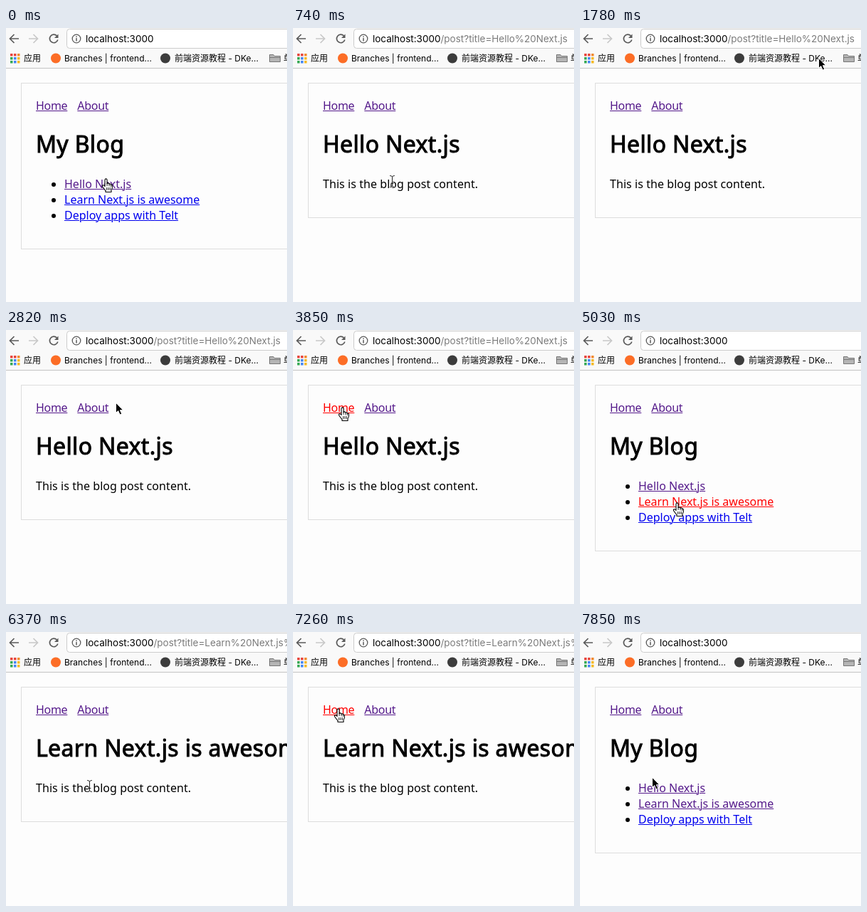
Write an HTML page that moves like this. It is 395 px wide and 385 px high and loops after 8 s.

```html
<!DOCTYPE html>
<html lang="en">
<head>
<meta charset="utf-8">
<title>My Blog</title>
<style>
html, body { margin: 0; width: 100%; height: 100%; overflow: hidden; background: #fdfdfd; }
body { position: relative; font: 16px/22px "Noto Sans", sans-serif; color: #000; }
svg { position: absolute; left: 0; top: 0; width: 395px; height: 385px; overflow: hidden; }
svg text { font: 12px Inter, "Noto Sans CJK SC", sans-serif; }
svg .url { font-size: 13.5px; }
#page { position: absolute; left: 21px; top: 77px; width: 500px; padding: 20px; border: 1px solid #ddd; }
nav { height: 22px; letter-spacing: -.3px; }
nav a { margin-right: 14px; float: left; }
a { color: #551a8b; text-decoration: underline; text-decoration-thickness: 1px; }
a.new { color: #00e; }
a.active { color: #f00; }
h1 {
  position: relative; top: -1px; margin: 21.44px 0; white-space: nowrap;
  font: 400 32px/45px "Noto Sans", sans-serif; letter-spacing: .35px; -webkit-text-stroke: 1px #000;
}
ul { margin: 16px 0; padding-left: 40px; }
p { margin: 16px 0; letter-spacing: .06px; }
[hidden] { display: none; }
</style>
</head>
<body>
<div id="page">
  <nav><a id="home">Home</a><a>About</a></nav>
  <h1 id="title"></h1>
  <ul id="list">
    <li><a id="hello">Hello Next.js</a></li>
    <li><a id="learn">Learn Next.js is awesome</a></li>
    <li><a class="new">Deploy apps with Telt</a></li>
  </ul>
  <p id="post">This is the blog post content.</p>
</div>

<svg viewBox="0 0 395 385">
  <path d="M0 0H395V56H0Z" fill="#f9f9f9"/>
  <path d="M0 56.5H395" stroke="#c4c4c4"/>
  <rect x="85.5" y="1.5" width="330" height="27" rx="4" fill="#fff" stroke="#ccc"/>

  <g fill="none" stroke="#5a5a5a" stroke-width="1.7">
    <path d="M18 15H6M11.500 9L5.500 15L11.500 21"/>
    <path d="M32 15H44M38.500 9L44.500 15L38.500 21" stroke="#c8c8c8"/>
    <path d="M71.500 11A5.800 5.800 0 1 0 72.800 16.500"/>
    <circle cx="99" cy="15" r="5.800" stroke-width="1.300"/>
    <path d="M99 14V18.500M99 11.500V13" stroke-width="1.500"/>
  </g>
  <path d="M73.500 8.500V14H68Z" fill="#5a5a5a"/>
  <text class="url" x="112" y="20">localhost:3000<tspan id="path" fill="#7b7b7b"></tspan></text>

  <g id="apps"></g>
  <text x="25" y="47">应用</text>
  <circle cx="70" cy="42.500" r="7" fill="#fc6d26"/>
  <text x="82" y="47">Branches | frontend...</text>
  <circle cx="224" cy="42.500" r="7" fill="#3c3c3c"/>
  <text x="237" y="47">前端资源教程 - DKe...</text>
  <path d="M370.500 47.500V37.500H376L377.500 39.500H385.500V47.500ZM370.500 41.500H385.500" fill="#b5b5b5" stroke="#777"/>
  <text x="390" y="47">单</text>

  <g id="cursor" stroke-linejoin="round" stroke-linecap="round">
    <path id="arrow" d="M0 0V14L3.200 11L5.600 16.500L8.200 15.300L5.900 10.200H10Z" fill="#000" stroke="#fff"/>
    <g id="beam" fill="none">
      <path d="M-3 -8Q0 -8 0 -6Q0 -8 3 -8M0 -6V6M-3 8Q0 8 0 6Q0 8 3 8M-1.500 3H1.500" stroke="#fff" stroke-width="2.500" opacity=".6"/>
      <path d="M-3 -8Q0 -8 0 -6Q0 -8 3 -8M0 -6V6M-3 8Q0 8 0 6Q0 8 3 8M-1.500 3H1.500" stroke="#222"/>
    </g>
    <g id="hand" stroke="#000" stroke-width="1.100">
      <path d="M-1.500 9V0Q-1.300 -1.600 0 -1.600Q1.400 -1.600 1.600 0V5Q3.800 3.500 4.600 5.700Q6.600 4.700 7.100 6.700Q9 6 9 8.500Q9.200 12 7.500 14V17H-.5V15Q-2.500 13 -4.800 9.500Q-5.600 7.500 -4 7.300Q-2.800 7.300 -1.500 9Z" fill="#fff"/>
      <path d="M1.600 5V8M4.600 6V8.500M7.100 7V9M1.200 11V14M3.500 11V14M5.800 11V14" fill="none" stroke-width=".9"/>
    </g>
  </g>
</svg>

<script>
const $ = id => document.getElementById(id);
const LOOP = 8000;
const shapes = ["arrow", "beam", "hand"];
const titles = { hello: "Hello Next.js", learn: "Learn Next.js is awesome" };

// time, open post ("" is the index), pressed link
const views = [
  [0, "", ""], [450, "", "hello"], [590, "hello", ""],
  [3850, "hello", "home"], [4150, "", ""],
  [5030, "", "learn"], [5180, "learn", ""],
  [7260, "learn", "home"], [7410, "", ""]
];

// time, cursor shape, hotspot
const moves = [
  [0, "hand", 140, 213], [740, "beam", 139, 215],
  [1190, "arrow", 150, 196], [1340, "arrow", 185, 150], [1490, "arrow", 235, 110],
  [1630, "arrow", 290, 75], [1780, "arrow", 335, 42], [1930, "beam", 355, 25],
  [2080, "beam", 362, 18], [2230, "beam", 363, 15],
  [2530, "arrow", 360, 40], [2680, "arrow", 250, 85], [2820, "arrow", 154, 102],
  [2970, "hand", 115, 110], [3120, "hand", 110, 109],
  [3410, "hand", 108, 109], [3560, "arrow", 92, 108], [3700, "hand", 75, 110], [3850, "hand", 69, 110],
  [4440, "arrow", 85, 150], [4590, "arrow", 120, 202], [4730, "hand", 136, 244],
  [5180, "arrow", 136, 244], [6370, "beam", 117, 216], [6520, "beam", 87, 172],
  [6820, "arrow", 76, 140], [6970, "hand", 68, 111], [7110, "hand", 63, 109],
  [7560, "hand", 61, 109], [7850, "arrow", 101, 204]
];

const at = (list, t) => list.findLast(step => step[0] <= t);

const tints = ["#e8453c", "#e8453c", "#f28b30", "#34a853", "#4285f4", "#f5b921", "#34a853", "#4285f4", "#f5b921"];
$("apps").innerHTML = tints.map((c, i) =>
  `<rect x="${6 + i % 3 * 5}" y="${36 + Math.floor(i / 3) * 5}" width="3.5" height="3.5" fill="${c}"/>`).join("");

function showView(t) {
  const [, post, pressed] = at(views, t);
  $("title").textContent = titles[post] || "My Blog";
  $("path").textContent = post && "/post?title=" + encodeURIComponent(titles[post]);
  $("list").hidden = !!post;
  $("post").hidden = !post;
  $("learn").classList.toggle("new", t < 5180);
  for (const id of ["home", "hello", "learn"]) $(id).classList.toggle("active", id === pressed);
}

function showCursor(t) {
  const [, shape, x, y] = at(moves, t);
  $("cursor").setAttribute("transform", `translate(${x + .5} ${y + .5})`);
  for (const id of shapes) $(id).style.display = id === shape ? "" : "none";
}

function frame() {
  const t = performance.now() % LOOP;
  showView(t);
  showCursor(t);
  requestAnimationFrame(frame);
}
frame();
</script>
</body>
</html>
```
